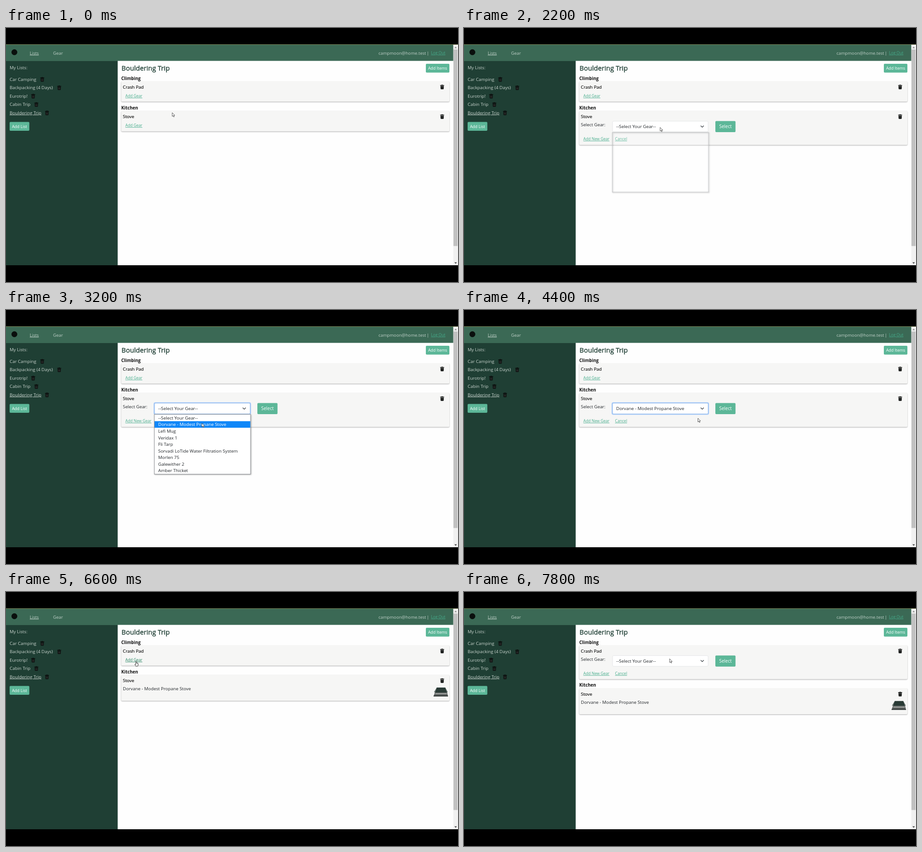
These frames come from a looping animation (998x561 px, 8000 ms). An HTML page:

```html
<!DOCTYPE html>
<html lang="en">
<head>
<meta charset="utf-8">
<title>Packing lists</title>
<style>
  html, body { margin: 0; width: 100%; height: 100%; overflow: hidden; background: #000; }
  svg { display: block; width: 100vw; height: 100vh; }
  text { font: 9.8px "Open Sans", "Noto Sans", sans-serif; fill: #212529; white-space: pre; }
  .title { font-size: 14.9px; fill: #1d3d33; stroke: #1d3d33; stroke-width: .35; }
  .group { font-size: 9.75px; font-weight: 700; fill: #111; }
  .item { fill: #111; stroke: #111; stroke-width: .2; }
  .link { font-size: 8.6px; fill: #45ac8b; text-decoration: underline; }
  .link.hover { fill: #23835f; }
  .nav { fill: #bfd0c8; font-size: 9.6px; }
  .side { fill: #c9d4ce; }
  .on { text-decoration: underline; }
  .btn { font-size: 8.95px; fill: #fff; text-anchor: middle; }
  .big { font-size: 10px; }
  .end { text-anchor: end; }
  .card { fill: #f6f6f5; filter: drop-shadow(.6px 1px .8px #0005); }
  .popup { filter: drop-shadow(1px 1px 1.5px #0005); }
</style>
</head>
<body>
<svg id="stage" viewBox="0 0 998 561" preserveAspectRatio="none"></svg>
<script>
const LOOP = 8000;
const GEAR = 'Dorvane - Modest Propane Stove';
const PROMPT = '--Select Your Gear--';
const OPTIONS = [PROMPT, GEAR, 'Lefi Mug', 'Veridax 1', 'Fli Tarp',
  'Sorvadi LoTide Water Filtration System', 'Morlen 75', 'Galewither 2', 'Amber Thicket'];
const LISTS = [['Car Camping', 113, 80], ['Backpacking (4 Days)', 131.5, 117.5],
  ['Eurotrip!', 150, 60], ['Cabin Trip', 168.5, 67], ['Bouldering Trip', 187, 90.5]];

// time, pointer x, pointer y, pointer shape
const POINTER = [
  [0, 367, 187, 'arrow'], [200, 352, 195, 'arrow'], [400, 312, 207, 'arrow'],
  [600, 282, 212, 'hand'], [800, 275, 212, 'hand'], [1200, 273, 212, 'arrow'],
  [1600, 318, 217, 'arrow'], [1800, 405, 220, 'arrow'], [2000, 433, 219.5, 'arrow'],
  [3000, 433, 236, 'arrow'], [3200, 432.5, 250, 'arrow'], [4200, 462, 249, 'arrow'],
  [4400, 516.5, 239, 'arrow'], [4800, 578, 213, 'hand'], [5400, 575.5, 214, 'arrow'],
  [5800, 558, 210, 'arrow'], [6000, 480, 191, 'arrow'], [6200, 380, 167, 'arrow'],
  [6400, 305, 154, 'arrow'], [6600, 287.5, 152.5, 'hand'], [7000, 286, 152, 'arrow'],
  [7200, 300, 154, 'arrow'], [7400, 350, 153, 'arrow'], [7600, 425, 149, 'arrow'],
  [7800, 454, 147.5, 'arrow']
];

// time, changes to the page
const PAGE = [
  [0, { kitchen: 'plain', climbing: 'plain', popup: 'none', value: PROMPT, focus: false, hot: 0, photo: false, hover: '' }],
  [600, { hover: 'kitchen' }],
  [1200, { kitchen: 'form', hover: '' }],
  [2200, { popup: 'fading' }],
  [2600, { popup: 'open', focus: true }],
  [3200, { hot: 1 }],
  [3800, { popup: 'none', value: GEAR }],
  [5200, { kitchen: 'filled', focus: false }],
  [5400, { photo: true }],
  [6600, { hover: 'climbing' }],
  [7000, { climbing: 'form', value: PROMPT, hover: '' }]
];

const rect = (x, y, w, h, fill, more = '') =>
  `<rect x="${x}" y="${y}" width="${w}" height="${h}" fill="${fill}" ${more}/>`;
const card = (y, h) => `<rect class="card" x="254.5" y="${y}" width="724.5" height="${h}" rx="2"/>`;
const path = (d, fill, more = '') => `<path d="${d}" fill="${fill}" ${more}/>`;
// y is the middle of the capitals
const text = (x, y, s, cls = '', drop = 3.5) => `<text x="${x}" y="${y + drop}" class="${cls}">${s}</text>`;
const group = (s, x, y) => `<g transform="translate(${x} ${y})">${s}</g>`;
const button = (x, y, w, h, s, cls = '') =>
  rect(x, y, w, h, '#5cb798', 'rx="2"') + text(x + w / 2, y + h / 2, s, 'btn ' + cls);
const trash = (x, y) => group(
  path('M-4.3-4.3H-1.5V-5H1.5V-4.3H4.3V-2.7H-4.3Z M-3.7-2.1H3.7L3.3 4.2Q3.2 5 2.4 5H-2.4Q-3.2 5-3.3 4.2Z', '#0b0d0c') +
  path('M-1.7-.8V3.6M0-.8V3.6M1.7-.8V3.6', 'none', 'stroke="#fff" stroke-opacity=".28" stroke-width=".6"'), x, y);

const SHAPES = {
  arrow: path('M0 0V8.2L1.9 6.5 3.3 9.5 4.6 8.9 3.2 6H5.8Z', '#fff', 'stroke="#333" stroke-width=".8"'),
  hand: path('M-.8 1Q0-.3.8 1V4.2Q4.3 4.2 4.3 6V8.6L3.3 11.4H-.8L-3 7.6Q-3.3 6.2-.8 7.3Z', '#fff', 'stroke="#222" stroke-width=".9"') +
    path('M1.9 4.8V6.4M3.1 5V6.4', 'none', 'stroke="#333" stroke-width=".5"')
};

const STOVE = group(
  path('M-9-10H10L14 1H-13Z', '#293a35') + path('M-9-10L-15 0-13 1ZM10-10L15.5 0 14 1Z', '#68736e') +
  path('M-13 1H14L16 9.5H-16Z', '#5c605f') + path('M-12 2.5H13L13.5 4.5H-12.5Z', '#a9aca9') +
  path('M-15.5 7.5H15.5L16 9.5H-16Z', '#2c3331'), 960, 221);

function frame() {
  return rect(0, 0, 998, 561, '#000') +
    rect(0, 36, 998, 1, '#7d8556') +
    rect(0, 37, 988, 36, '#3b6955') +
    rect(0, 73, 247, 451, '#1f3f34') +
    rect(246.6, 72.6, 741.4, 451.4, '#fefefe') +
    rect(987.5, 37, 10.5, 487, '#f1f1f1') + rect(988, 47.5, 9, 434, '#c1c1c1') +
    path('M990 44.5L992.8 41.2 995.6 44.5Z', '#8a8a8a') + path('M990 517.5L992.8 520.8 995.6 517.5Z', '#444') +
    '<circle cx="18.5" cy="53.5" r="6.5" fill="#0a0f0d"/>' +
    text(52.5, 55, 'Lists', 'nav on') + text(104, 55, 'Gear', 'nav') +
    text(927.5, 55, 'campmoon@home.test', 'nav end') + text(929, 55, '|', 'nav') +
    text(938.5, 55, 'Log Out', 'link', 3.2) +
    text(8, 87, 'My Lists:', 'side') +
    LISTS.map(([s, y, x], i) => text(8, y, s, i == 4 ? 'side on' : 'side') + trash(x, y + .6)).join('') +
    button(8, 207.5, 43.5, 19.5, 'Add List') +
    text(255, 89, 'Bouldering Trip', 'title', 5.3) +
    button(927, 79, 52, 19.5, 'Add Items') +
    text(254.5, 111, 'Climbing', 'group');
}

function form(value, focus) {
  return text(258, 213.5, 'Select Gear:') +
    (focus ? rect(327, 204.8, 213, 25.6, 'none', 'rx="3" stroke="#a9cbf8" stroke-width="2.2"') : '') +
    rect(328, 205.8, 211, 23.6, '#fff', `rx="2.5" stroke="${focus ? '#86b0e8' : '#dfe1e3'}" stroke-width=".8"`) +
    text(336, 217.5, value) +
    path('M522.6 215.8L526 219.2 529.4 215.8', 'none', 'stroke="#343a40" stroke-width="1.3"') +
    button(555, 205.5, 44.5, 24.5, 'Select', 'big') +
    text(263.5, 245, 'Add New Gear', 'link', 3.2) + text(333.5, 245, 'Cancel', 'link', 3.2);
}

function popup(mode, hot) {
  if (mode == 'none') return '';
  const box = (fill, more) => rect(327.5, 230.5, 212.5, 132, fill, more);
  // only the outline casts a shadow, so the page stays visible through the fade
  if (mode == 'fading') return box('#fff', 'fill-opacity=".15"') + box('none', 'class="popup" stroke="#c4c6c8"');
  return box('#fff', 'class="popup" stroke="#8b8f94"') +
    rect(328, 231 + hot * 14.55, 211.5, 14.5, '#1087f8') +
    OPTIONS.map((s, i) => `<text x="336" y="${241.9 + i * 14.55}"${i == hot ? ' style="fill:#fff"' : ''}>${s}</text>`).join('');
}

function page(s) {
  const topForm = s.climbing == 'form';
  const link = (y, name) => text(263.5, y, 'Add Gear', s.hover == name ? 'link hover' : 'link', 3.2);
  const tall = { plain: 45, form: 75, filled: 57 }[s.kitchen];
  const body = {
    plain: () => link(215, 'kitchen'),
    form: () => form(s.value, s.focus),
    filled: () => text(258, 213.5, GEAR) + (s.photo ? STOVE : '')
  }[s.kitchen]();
  const climbing = card(118, topForm ? 74.5 : 44.5) + text(258, 130, 'Crash Pad', 'item') + trash(963, 130.3) +
    (topForm ? group(form(s.value, s.focus), 0, -65.3) : link(150, 'climbing'));
  const kitchen = text(254.5, 176, 'Kitchen', 'group') + card(183.2, tall) +
    text(258, 195.5, 'Stove', 'item') + trash(963, 195.8) + body;
  return climbing + group(kitchen, 0, topForm ? 29.8 : 0) + popup(s.popup, s.hot);
}

const stage = document.getElementById('stage');
stage.innerHTML = frame() + '<g id="page"></g><g id="pointer"></g>';
const pageNode = document.getElementById('page');
const pointer = document.getElementById('pointer');

let shownPage = -1, shownStep = -1;
function draw(t) {
  const pageStep = PAGE.filter(p => p[0] <= t).length;
  const step = POINTER.filter(p => p[0] <= t).length;
  if (pageStep != shownPage) {
    shownPage = pageStep;
    pageNode.innerHTML = page(Object.assign({}, ...PAGE.slice(0, pageStep).map(p => p[1])));
  }
  if (step != shownStep) {
    shownStep = step;
    const [, x, y, shape] = POINTER[step - 1];
    pointer.innerHTML = group(SHAPES[shape], x, y);
  }
}

const start = performance.now();
function tick() {
  draw((performance.now() - start) % LOOP);
  requestAnimationFrame(tick);
}
tick();
</script>
</body>
</html>
```
